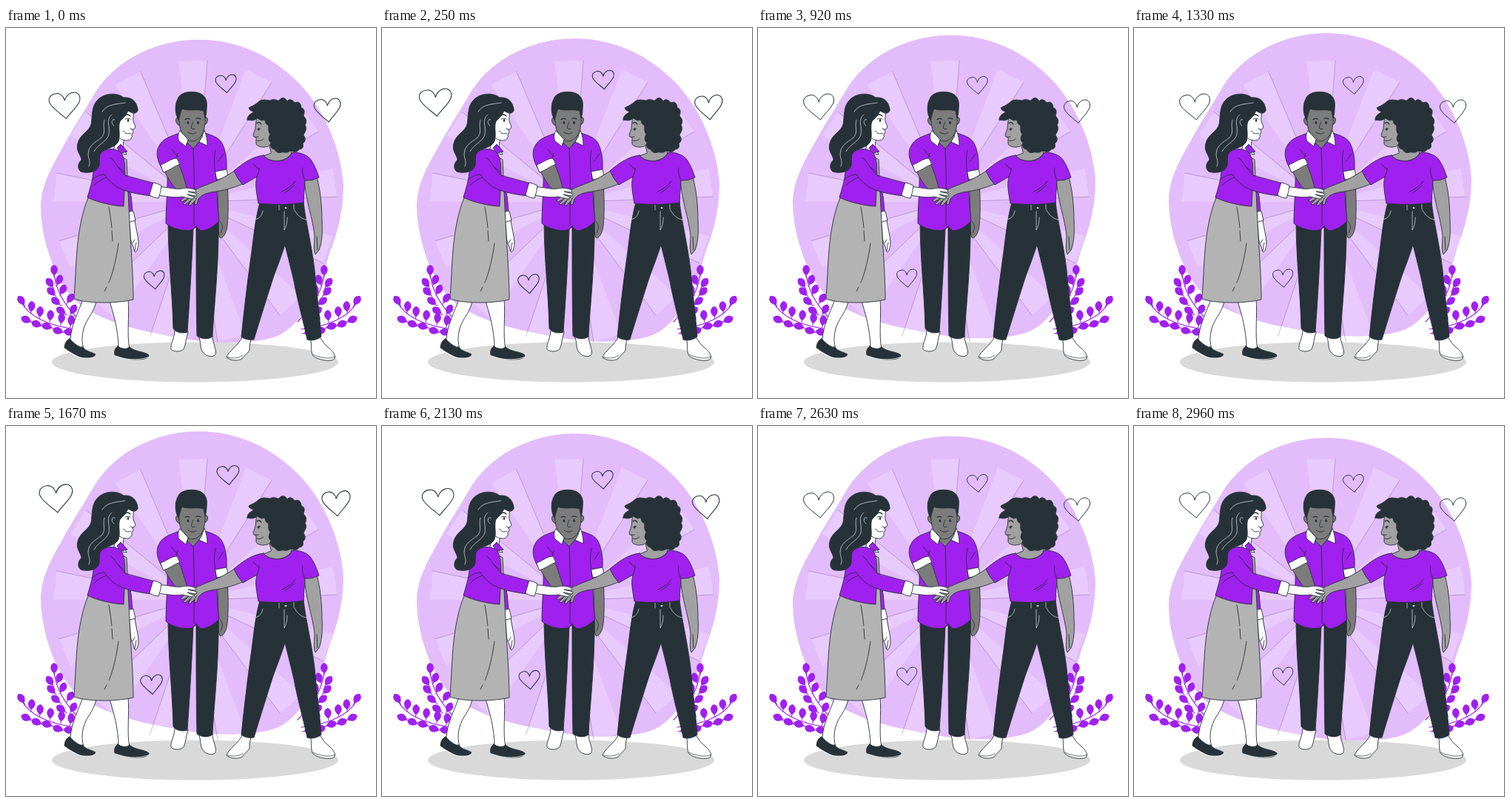
Animation, 500 px wide and 500 px high, one loop 3 s. Source, as an HTML page with a canvas:

```html
<!DOCTYPE html>
<html lang="en">
<head>
<meta charset="utf-8">
<title>Hands together</title>
<style>
html, body { margin: 0; width: 100%; height: 100%; overflow: hidden; background: #fff; }
canvas { display: block; width: 100vw; height: 100vh; }
</style>
</head>
<body>
<canvas id="stage"></canvas>
<script>
const canvas = document.getElementById('stage');
const ctx = canvas.getContext('2d');
const dpr = window.devicePixelRatio || 1;
canvas.width = canvas.height = 500 * dpr;

const INK = '#263238', PURPLE = '#a020f0', PALE = '#e3bcfb', WHITE = '#fff';
const SKIRT = '#b3b3b3', SKIN_MAN = '#7c7c7c', SKIN_WOMAN = '#a1a1a1';
const LOOP = 3000, BEAT = 1500, LEAD = 25;

function shape(d, fill, width = 0.9) {
  const p = new Path2D(d);
  ctx.fillStyle = fill;
  ctx.fill(p);
  if (width) {
    ctx.strokeStyle = INK;
    ctx.lineWidth = width;
    ctx.stroke(p);
  }
}
function line(d, color = INK, width = 0.9) {
  ctx.strokeStyle = color;
  ctx.lineWidth = width;
  ctx.stroke(new Path2D(d));
}
function dot(x, y, rx, ry, color = INK) {
  ctx.fillStyle = color;
  ctx.beginPath();
  ctx.ellipse(x, y, rx, ry, 0, 0, 7);
  ctx.fill();
}

// Background
const BLOB = `M257 16 C312 15 361 38 398 77 C431 112 453 165 456 212 C456 245 449 275 437 305
  C427 343 407 389 379 409 C361 423 331 425 300 425.5 C266 426 232 419 198 412 C158 404 116 389 94 369
  C68 344 48 290 47 244 C47 212 62 188 78 159 C92 134 106 112 118 92 C142 49 196 17 257 16Z`;

function drawRays() {
  for (let i = 0; i < 13; i++) {
    ctx.save();
    ctx.translate(256, 235);
    ctx.rotate((i * 360 / 13 - 1) * Math.PI / 180);
    ctx.fillStyle = 'rgba(255,255,255,.2)';
    ctx.fill(new Path2D('M-2 -16 L-19.5 -190.5 H19.5 L2 -16Z'));
    line('M19.5 -190.5 L2 -16', 'rgba(90,60,110,.42)', 0.7);
    ctx.restore();
  }
}

// Plants: each leaf is x, y, angle in degrees
const LEAVES = [
  [20.5, 368, -32], [34.5, 376, 5], [27, 394, -66], [46, 383, 2], [41, 400, -70],
  [60, 388, 5], [55, 403, -72], [75, 392, 6], [70, 409, -75], [88, 395, 8], [85, 411, -78],
  [65, 327, 0], [72, 340, 20], [59, 344, -35], [77, 353, 26], [61, 356, -45],
  [87, 365, 32], [67, 369, -50], [91, 380, 30], [74, 382, -55]
];
function drawPlant() {
  line('M21 371 C31 389 56 403 96 407 M65 331 C67 354 78 374 101 397', PURPLE, 1.2);
  for (const [x, y, a] of LEAVES) {
    ctx.save();
    ctx.translate(x, y);
    ctx.rotate(a * Math.PI / 180);
    shape('M0 -7 C5.5 -5 7.5 2 0 7.5 C-7 2 -5.5 -5 0 -7Z', PURPLE, 0);
    line('M0 5 V10', PURPLE, 1);
    ctx.restore();
  }
}

// Hearts
const HEART = new Path2D(`M.5 .31 C.47 .15 .36 .02 .22 .05 C.04 .08 -.04 .24 .02 .4 C.09 .6 .36 .8 .55 1
  C.66 .8 .87 .6 .96 .38 C1.03 .2 .97 .02 .82 0 C.66 -.01 .53 .14 .5 .31Z`);
const hearts = new Path2D();
for (const [x, y, w, h] of [[61.5, 89, 41.5, 35], [282.5, 65.5, 28, 24], [413.5, 97, 35.5, 31.5], [187.5, 326, 27.5, 24.5]])
  hearts.addPath(HEART, new DOMMatrix([w, 0, 0, h, x, y]));

function beat(p) {
  if (p < 0.1) return 1 + p;
  if (p < 0.3) return 1.1 - (p - 0.1) / 2;
  if (p < 0.4) return 1;
  if (p < 0.5) return 1 + (p - 0.4);
  if (p < 0.6) return 1.1 - (p - 0.5);
  return 1;
}
function drawHearts(s) {
  ctx.save();
  ctx.translate(255, 208);
  ctx.scale(s, s);
  ctx.translate(-255, -208);
  ctx.strokeStyle = INK;
  ctx.lineWidth = 1;
  ctx.stroke(hearts);
  ctx.restore();
}

function drawMan() {
  // far arm, shoes, trousers
  shape('M286 200 L299 198 C300 225 301 250 299 267 C298 277 294 283 290 284 C286 282 288 272 287 262Z', SKIN_MAN);
  line('M290 262 C293 267 293 272 290 277');
  shape('M228 409 C228 418 222 427 223 434 C226 438 236 438 240 434 C243 428 243 420 246 411Z', WHITE);
  shape('M260 416 C264 424 262 434 266 438 C271 445 281 445 283 441 C285 434 279 426 279 416Z', WHITE);
  shape('M219 260 C219 310 225 360 226 406 C230 412 239 413 245 411 C248 370 251 320 253 271 L257 269 C257 320 257 370 258 416 C265 421 274 421 279 417 C281 375 288 320 287 258Z', INK);
  // neck and head
  shape('M240 139 L263 139 L266 150 L253 164 L239 151Z', SKIN_MAN);
  shape('M233 122 C228 118 228 131 235 132Z M269 121 C274 118 274 130 268 131Z', SKIN_MAN);
  shape('M234 110 C233 122 234 136 238 143 C243 151 248 153 252 153 C260 152 266 146 268 135 C270 125 269 116 268 108Z', SKIN_MAN);
  shape('M233 124 C228 116 228 103 232 96 C235 87 248 85 258 87 C268 89 273 97 271 109 C271 115 270 120 269 122 L267 112 C258 109 246 113 238 109 C236 113 235 119 233 124Z', INK);
  line('M242 123.5 Q245 121.5 248 123 M257 122.5 Q260 121 263 123', INK, 1.3);
  dot(246, 128, 1.4, 1.9);
  dot(259.5, 128, 1.4, 1.9);
  line('M253 127 C251 131 249 136 252 136.5 H255 M246 141 Q252 145 257 141.5');
  // shirt
  shape('M234 142 C222 147 211 149 206 161 C202 170 205 181 211 190 L218 187 C219 215 216 241 216 264 C225 272 242 275 250 273 Q255 272 257 267 Q259 272 264 274 C274 273 282 267 288 261 C285 238 285 216 284 194 L298 191 C299 176 296 162 291 154 C286 147 278 145 269 142 L265 149 L253 163 L240 150Z', PURPLE);
  line('M253 163 C255 200 254 235 254 267 M283 194 C281 184 281 174 283 165 M218 187 C224 181 230 179 232 169 M224 164 L232 174 M287 180 L294 170');
  shape('M235 139 C232 143 232 149 234 153 L243 160 L246 151Z M268 138 C271 145 272 152 272 159 L261 154 L265 147Z', WHITE);
  shape('M283 194 L298 191 Q300 196 299 202 L285 205Z', WHITE);
  // near arm
  shape('M213 192 C218 202 227 216 235 224 L245 219 C242 207 238 195 233 182Z', SKIN_MAN);
  shape('M209 185 C215 183 224 176 231 176 L235 184 C227 187 220 193 213 195Z', WHITE);
}

function drawGirl() {
  // far arm
  shape('M163 216 L168 222 C170 230 170 239 171 249 L163 250Z', PURPLE);
  shape('M166 260 L174 259 C175 270 179 281 179 291 C179 296 177 302 175 303 C172 301 173 296 171 293 C167 287 169 276 166 260Z', WHITE);
  line('M171 291 L174 286 M174 301 L176 290');
  shape('M163 249 L172 247 L175 260 L164 263Z', WHITE);
  // legs and shoes
  shape('M104 366 C99 382 88 401 87 421 L91 430 L105 434 C101 420 103 406 111 393 C117 384 121 376 122 368Z', WHITE);
  shape('M139 366 C145 385 152 409 152 432 L167 435 C163 413 167 390 165 366Z', WHITE);
  shape('M86 420 C82 421 79 427 79 432 C85 437 92 440 99 444 C107 447 119 446 121 441 C114 437 107 437 104 431 Q98 433 86 420Z', INK);
  line('M80 434 C88 440 96 445 105 446 H118', WHITE, 0.7);
  shape('M151 430 C147 433 146 437 147 442 C156 445 165 448 174 448 C184 448 193 447 193 442 C188 437 174 438 167 431 Q160 437 151 430Z', INK);
  line('M148 443 C160 448 176 450 192 445', WHITE, 0.7);
  // dress
  shape('M113 225 C103 246 97 278 95 314 L92 366 C108 372 146 373 172 367 C172 333 168 290 166 242 L163 178 L150 170Z', SKIRT);
  line('M139 242 C141 254 142 261 143 270 M143 274 L144 288 M152 291 C149 314 143 335 139 344 M136 350 L133 356');
  // neck and face
  shape('M148 145 L160 150 C156 159 160 164 163 171 L146 168Z', WHITE);
  shape('M152 112 L172 110 C173 118 171 122 172 126 L175 134 Q174 137 171 137 L172 141 L170 144 C171 150 167 152 163 152 C158 152 154 150 151 147Z', WHITE);
  line('M160 119 Q164 115 168 119', INK, 1.3);
  dot(165, 125, 1.2, 2);
  line('M161 123 Q164 121 168 123 M159 139 C161 143 165 144 169 142 M171 137 L168 136');
  // jacket
  shape('M150 162 L155 157 L164 167 L156 169Z', PURPLE);
  shape('M127 166 C137 163 148 162 155 168 C160 175 161 184 161 199 L159 241 C143 240 125 236 110 229 C113 218 117 207 118 195 C118 184 120 172 127 166Z', PURPLE);
  // hair
  shape('M178 109 C176 98 169 93 159 94 C150 87 133 87 123 98 C115 107 117 120 115 130 C112 141 100 143 97 156 C94 166 101 171 102 178 C97 183 96 190 101 194 C109 197 122 195 125 188 C128 181 124 174 129 168 C137 161 148 162 152 153 C155 144 151 134 154 126 C159 122 163 116 165 112 C169 114 174 118 178 112Z', INK);
  line('M130 113 C136 103 149 103 161 101 M143 117 C134 124 141 133 139 144 C136 154 124 157 119 167 M133 124 C130 135 136 140 129 148 C120 155 112 158 111 170 C111 177 115 180 112 187', '#e6e9ea', 0.7);
  line('M147 124 C142 122 142 130 146 132', '#e6e9ea', 0.7);
  // near arm
  shape('M129 169 C139 168 148 176 153 188 Q157 197 166 201 L201 210 L196 227 C181 225 163 222 152 216 C142 211 132 198 127 185', PURPLE, 0);
  line('M141 175 C147 180 154 193 161 199 L201 210 L196 227 C181 225 163 222 152 216 C144 212 138 205 133 198 M117 205 C122 200 128 198 133 198 M119 213 Q126 205 136 202 M152 188 L160 195');
  shape('M206 215 C217 214 229 219 238 217 C244 215 252 217 257 219 L256 222 L246 221 L258 224 L257 227 L245 225 L255 229 L252 231 L238 228 C226 230 215 227 205 226Z', WHITE);
  shape('M199 209 Q205 210 210 213 Q209 223 206 230 Q200 230 194 226Z', WHITE);
}

function drawWoman() {
  // shoes
  shape('M319 418 C316 427 300 437 298 445 C303 450 315 450 319 447 C324 440 331 437 329 432 L331 419Z', WHITE);
  line('M299 445 C308 447 316 446 320 442', INK, 0.7);
  shape('M411 419 C414 426 411 438 415 443 C422 449 437 451 443 448 C447 444 442 437 437 433 Q429 427 425 419Z', WHITE);
  line('M415 441 C424 446 437 448 445 444', INK, 0.7);
  // far-side arm
  shape('M403 203 L420 201 C425 220 427 241 427 261 C428 275 427 291 423 300 L418 306 C415 300 417 291 417 281 C415 258 405 235 403 203Z', SKIN_WOMAN);
  line('M420 282 L421 300');
  // trousers
  shape('M343 236 L402 234 C404 257 413 292 417 327 C420 360 424 390 426 417 C420 422 412 423 407 421 C402 397 393 365 389 342 C385 325 381 309 377 293 C370 315 363 331 359 344 C351 369 343 395 335 421 C329 422 322 421 318 417 C322 380 326 344 332 302 C335 279 337 257 343 236Z', INK);
  line('M347 247 C346 254 342 258 336 259 M390 246 C393 253 399 258 406 259 M376 248 L376 273 Q380 267 380 256 M369 239 V246 M389 238 V245', '#dfe3e5', 0.7);
  dot(378, 243, 1.3, 1.3, '#dfe3e5');
  // reaching arm
  shape('M310 192 C296 202 282 208 268 213 C259 217 251 220 246 224 L236 233 L238 235 L246 231 L239 238 L242 239 L250 233 L246 240 L249 240 L255 234 L255 239 L258 238 L260 231 C264 226 268 224 277 222 C293 220 308 216 319 211Z', SKIN_WOMAN);
  line('M246 231 L252 226 M250 233 L255 228 M255 234 L258 229');
  // neck and face
  shape('M355 152 L381 155 L386 169 C380 181 358 184 348 173 L358 169Z', SKIN_WOMAN);
  shape('M339 120 C337 128 338 134 336 139 Q333 145 335 147 L338 148 L338 157 C341 161 347 162 354 160 L363 152 L365 125 L353 118Z', SKIN_WOMAN);
  line('M339 129 Q342 126 345 130', INK, 1.3);
  line('M339 137 Q341 134 344 136 M339 152 Q343 154 348 150 M337 147 L341 147');
  dot(341.5, 137, 1.1, 1.7);
  // hair
  shape('M326 124 C326 117 332 116 335 113 Q329 112 328 108 C333 105 337 104 341 100 C347 95 352 98 357 98 C362 95 366 98 369 98 C373 92 378 95 380 99 C384 94 389 99 390 101 C397 98 399 104 399 108 C405 109 403 116 402 119 C407 123 406 129 404 131 C408 137 403 141 402 145 C406 150 404 154 401 156 C403 163 398 164 396 164 C393 170 387 166 384 166 C379 170 375 167 372 168 C367 170 364 166 363 164 C357 163 357 158 358 155 C353 151 356 146 357 143 C353 139 356 134 354 131 C350 130 351 126 349 124 C344 127 341 121 339 122 C335 126 330 125 326 124Z', INK);
  // T-shirt
  shape('M348 172 C354 182 379 184 387 168 C397 168 407 171 412 178 C417 185 420 193 423 202 Q414 207 404 206 L402 236 C383 239 360 239 341 237 C339 224 336 213 339 201 L320 212 Q312 203 308 193 C319 184 331 174 348 172Z', PURPLE);
  line('M339 201 C341 197 342 193 342 189 M404 206 C401 200 400 195 401 189 M342 191 L334 184 M373 221 C381 217 387 213 391 207 M377 222 Q385 218 389 213');
}

function draw(ms) {
  const t = (ms + LEAD) % LOOP;
  const lift = 10 * (1 - Math.abs(t / (LOOP / 2) - 1));
  ctx.setTransform(dpr, 0, 0, dpr, 0, 0);
  ctx.lineJoin = ctx.lineCap = 'round';
  ctx.fillStyle = WHITE;
  ctx.fillRect(0, 0, 500, 500);

  ctx.save();
  ctx.translate(0, -lift);
  shape(BLOB, PALE, 0);
  ctx.restore();
  drawRays();
  drawHearts(beat((t % BEAT) / BEAT));
  dot(255.5, 451.5, 193.5, 27, '#d9d9d9');

  drawPlant();
  ctx.save();
  ctx.translate(495, 0);
  ctx.scale(-1, 1);
  drawPlant();
  ctx.restore();

  drawMan();
  drawWoman();
  drawGirl();
}

const start = performance.now();
function tick() {
  draw(performance.now() - start);
  requestAnimationFrame(tick);
}
tick();
</script>
</body>
</html>
```
